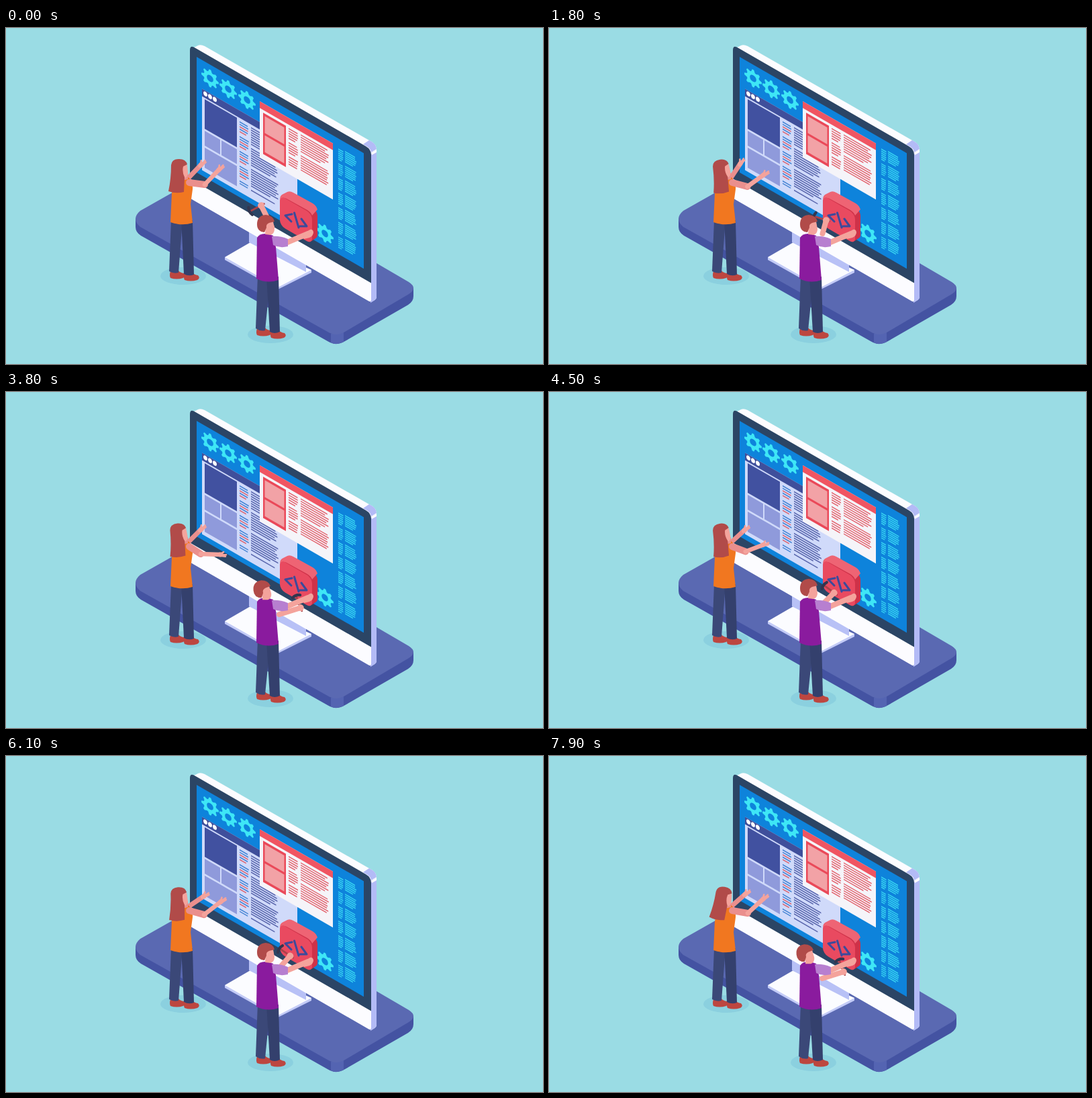
Animation, 800 px wide and 500 px high, one loop 8 s. Source, as an HTML page:

```html
<!DOCTYPE html>
<html lang="en">
<head>
<meta charset="utf-8">
<title>Building a page</title>
<style>
html, body { margin: 0; width: 100%; height: 100%; overflow: hidden; background: #9adce4; }
svg { display: block; width: 800px; height: 500px; }
</style>
</head>
<body>
<svg id="stage" viewBox="0 0 800 500" xmlns="http://www.w3.org/2000/svg"></svg>
<script>
const LOOP = 8000, STEP = 100, SWING = 820, HIT = 3800;
const SKIN = '#f4a39c', SKIN_DARK = '#ea8f8d', HAIR = '#b14b49', DENIM = '#3b4878', SHOE = '#bd4640';
const SLOPE = 0.575;

const path = (d, fill, more = '') => `<path d="${d}" fill="${fill}" ${more}/>`;
const line = (d, color, width) =>
  path(d, 'none', `stroke="${color}" stroke-width="${width}" stroke-linecap="round" stroke-linejoin="round"`);
const rect = (x, y, w, h, fill, r = 0) =>
  `<rect x="${x}" y="${y}" width="${w}" height="${h}" rx="${r}" fill="${fill}"/>`;
const oval = (x, y, rx, ry, fill) => `<ellipse cx="${x}" cy="${y}" rx="${rx}" ry="${ry}" fill="${fill}"/>`;
const wall = (x, y, inner) => `<g transform="matrix(1 ${SLOPE} 0 1 ${x} ${y})">${inner}</g>`;

let seed = 11;
const random = () => (seed = (seed * 16807) % 2147483647) / 2147483647;

// Rows of text as bars; a gap follows each group of rows.
function rows(x, y, width, count, group, pitch, gap, color, accent = color) {
  let out = '';
  for (let i = 0; i < count; i++) {
    const top = y + i * pitch + Math.floor(i / group) * gap;
    const short = i % group === group - 1 ? 0.7 : 0.86 + random() * 0.14;
    out += rect(x, top, width * short, 1.7, i % group === 2 || i % group === 4 ? accent : color);
  }
  return out;
}

function gear(x, y) {
  let d = '';
  for (let i = 0; i < 32; i++) {
    const a = (i - 0.5) / 32 * Math.PI * 2;
    const r = i % 4 < 2 ? 13 : 9.6;
    d += `${i ? 'L' : 'M'}${(x + r * Math.cos(a)).toFixed(1)} ${(y + r * Math.sin(a)).toFixed(1)}`;
  }
  d += `ZM${x - 4.8} ${y}a4.8 4.8 0 1 0 9.6 0a4.8 4.8 0 1 0 -9.6 0Z`;
  return path(d, '#3ee6f6', 'fill-rule="evenodd"');
}

function platform() {
  const top = 'M200 272L246 246Q262 238 278 246L552 350L600 378Q614 387 600 396L505 452Q492 460 479 452L200 296Q186 284 200 272Z';
  return path('M193 283L193 296Q193 304 201 309L479 466Q492 474 505 466L599 412Q607 407 607 399L607 387Z', '#4453a2')
    + path('M484 455L484 468Q492 473 503 467L503 453Z', '#5464b2')
    + path(top, '#5a69b2');
}

function stand() {
  return path('M326 341L326 345L405 389L455 364L455 360Z', '#c3cbf7')
    + path('M326 341L364 319L455 360L405 386Z', '#fbfcff')
    + path('M362 298L447 345L447 363L362 319Z', '#b8c1f6');
}

function monitor() {
  const shell = path('M274 40Q274 33 280 29L286 26Q290 24 296 27L546 170Q552 174 552 182L552 400Q552 403 549 405L544 408L274 253Z', '#fcfcff')
    + path('M544 186L552 181L552 400Q552 403 549 405L543 409Z', '#b3bbf6')
    + path('M532 173L541 167L546 170Q551 173 552 180L544 185Q543 179 537 176Z', '#b3bbf6')
    + path('M544 186L552 181L552 185L545 189Z', '#fcfcff');
  const face = rect(-10, 180, 270, 36, '#fcfcff', 4)
    + path('M-10 -4Q-10 -13 -2 -12L252 -12Q260 -12 260 -4L260 187L-10 187Z', '#2b4565')
    + rect(0, 0, 249, 172, '#0e83db');
  return shell + wall(284, 43, face + contents());
}

function contents() {
  let out = [[20, 20.5], [47, 21], [75, 21], [191, 153]].map(p => gear(...p)).join('');

  // Lavender window
  out += rect(8, 43, 142, 121, '#d0dafa') + rect(8, 43, 142, 11, '#3f4f9b');
  for (const x of [13, 20, 27]) out += oval(x, 47.6, 3, 3.4, '#fff');
  out += rect(12, 56, 48, 44, '#4151a0') + rect(12, 103, 23, 22, '#8f9adb')
    + rect(37, 103, 23, 22, '#8f9adb') + rect(12, 128, 48, 30, '#8f9adb')
    + rows(64, 59, 14, 22, 5, 3.6, 4, '#3f80d2', '#dc6672')
    + rows(81, 58, 41, 25, 8, 3.5, 3, '#5865ac');

  // Red window
  out += rect(94, 12, 109, 83.5, '#f5f4f9') + rect(94, 12, 109, 10, '#f05562')
    + rect(99, 26, 34, 61.5, '#ea4959')
    + rect(101.5, 30, 29, 25, '#f2a2a6') + rect(101.5, 58.5, 29, 25, '#f2a2a6')
    + rows(137, 27, 14, 14, 5, 3.6, 3, '#e3636e')
    + rows(155, 26, 42, 15, 8, 3.5, 3, '#e3636e');

  // Code strip
  out += rows(211, 15, 7.5, 42, 6, 3, 3.8, '#38d4f2') + rows(221, 13, 17, 42, 6, 3, 3.8, '#38d4f2');
  return out;
}

function tag() {
  let out = '';
  for (let i = 8; i >= 1; i--) {
    out += wall(408 + i, 249 - i * 0.68, rect(0, 0, 48, 45, '#cf3249', 8));
  }
  return out
    + path('M408 255Q408 249 413 247L419 244Q423 242 428 245L457 261Q462 264 464 270L456 279Q454 274 449 271L418 254Q412 251 408 255Z', '#ee6474')
    + wall(408, 249, rect(0, 0, 48, 45, '#e94a60', 8))
    + line('M426 277L416 279L425 288M429.5 275L436 297M440 284L448 295L438 295', '#3c4a9b', 3);
}

const shoe = (x, y) => path(`M${x} ${y - 6}L${x + 12} ${y - 7}Q${x + 14} ${y - 4} ${x + 20} ${y - 3}Q${x + 24} ${y + 1} ${x + 19} ${y + 4}Q${x + 9} ${y + 7} ${x} ${y + 4}Q${x - 2} ${y} ${x} ${y - 6}Z`, SHOE);

function woman() {
  return oval(264, 369, 34, 13, '#8bd0df')
    + shoe(245, 368) + shoe(266, 371)
    + path('M246 286L263 286L257 364Q250 366 243 362Z', DENIM)
    + path('M261 286L278 286L280 367Q272 370 265 366Z', '#34406d')
    + '<g id="farArm"></g>'
    + path('M252 222L270 221Q279 227 278 240L275 262L278 290Q262 295 245 289L247 246Z', '#f17720')
    + path('M262 214L271 216L271 225L262 227Z', SKIN_DARK)
    + '<g id="nearArm"></g>'
    + '<g id="girlHead">'
    + path('M262 202L270 204L271 215Q271 222 266 223L259 222Z', SKIN)
    + path('M246 204Q247 195 258 195Q268 195 270 203L264 206Q262 214 266 222L265 244Q253 247 242 243Q246 224 246 204Z', HAIR)
    + '</g>';
}

function man() {
  return oval(394, 456, 34, 13, '#8bd0df')
    + shoe(374, 453) + shoe(395, 457)
    + path('M375 368L394 370L386 450Q379 452 372 447Z', DENIM)
    + path('M388 370L406 370L408 452Q400 456 393 452Z', '#34406d')
    + path('M374 312Q378 305 389 306L398 309L402 326L406 375Q389 381 373 373Z', '#8a1b9e')
    + line('M419 319L450 306', SKIN, 8)
    + path('M443 306L453 300Q457 299 458 304Q458 309 452 312L444 314Z', SKIN)
    + path('M396 310Q408 309 420 314L420 325Q408 328 398 323Z', '#b77fd0')
    + '<g id="manHead">'
    + path('M387 290L398 288L400 299Q400 306 394 308L386 307Z', SKIN)
    + path('M374 292Q374 279 387 278Q398 279 400 288L392 290Q387 292 388 297L385 304Q374 303 374 292Z', HAIR)
    + '</g>';
}

stage.innerHTML = platform() + stand() + monitor() + tag() + woman() + '<g id="hammer"></g>' + man();
const part = id => document.getElementById(id);
const parts = Object.fromEntries(['farArm', 'nearArm', 'girlHead', 'hammer', 'manHead'].map(id => [id, part(id)]));

// time, head tilt, far hand, near elbow, near hand
const TYPING = [
  [0, 0, 291, 203, 296, 233, 318, 210],
  [1100, -9, 287, 202, 295, 237, 321, 222],
  [2500, -6, 284, 200, 296, 235, 320, 214],
  [3800, -6, 291, 204, 290, 241, 320, 242],
  [5300, -9, 293, 206, 296, 233, 319, 209],
  [7000, 5, 298, 211, 294, 240, 323, 225],
  [7900, 9, 293, 205, 296, 234, 320, 212]
];
// phase, elbow, hand, hammer angle, head dip
const STRIKE = [
  [0, 407, 331, 439, 321, 249, 1],
  [120, 411, 314, 425, 297, 214, 0],
  [300, 396, 296, 380, 264, 152, 0],
  [340, 403, 298, 399, 271, 177, 0],
  [580, 412, 314, 427, 301, 219, 0],
  [680, 410, 312, 423, 297, 214, 0],
  [740, 412, 316, 430, 304, 223, 0],
  [SWING, 407, 331, 439, 321, 249, 1]
];

function pose(table, t) {
  let i = 1;
  while (i < table.length - 1 && table[i][0] < t) i++;
  const a = table[i - 1], b = table[i];
  const k = (t - a[0]) / (b[0] - a[0]);
  const e = (1 - Math.cos(Math.PI * k)) / 2;
  return a.slice(1).map((v, n) => v + (b[n + 1] - v) * e);
}

function hand(x, y, ex, ey) {
  const turn = Math.atan2(y - ey, x - ex) * 180 / Math.PI;
  return `<g transform="translate(${x} ${y}) rotate(${turn})">${oval(-1, 0, 5, 3.5, SKIN)}${line('M1 -2L4 -4M1 0L8 0M1 2L7 2.5', SKIN, 2.6)}</g>`;
}

function draw(t) {
  const [tilt, fx, fy, ex, ey, nx, ny] = pose(TYPING, t);
  parts.girlHead.setAttribute('transform', `rotate(${tilt} 262 220)`);
  parts.farArm.innerHTML = line(`M269 226L${fx} ${fy}`, SKIN_DARK, 7) + hand(fx, fy, 269, 226);
  parts.nearArm.innerHTML = line(`M273 230L${ex} ${ey}`, SKIN_DARK, 10)
    + line(`M${ex} ${ey}L${nx} ${ny}`, SKIN, 6.5) + hand(nx, ny, ex, ey);

  const phase = ((t - HIT) % SWING + SWING) % SWING;
  const [bx, by, hx, hy, angle, dip] = pose(STRIKE, phase);
  parts.manHead.setAttribute('transform', `translate(${-4 * dip} ${2 * dip}) rotate(${-6 * dip} 388 306)`);
  parts.hammer.innerHTML = line(`M${bx} ${by}L${hx} ${hy}`, SKIN, 8)
    + `<g transform="translate(${hx} ${hy}) rotate(${angle})">`
    + line('M-5 0L18 0', '#a8434a', 2.8) + line('M18 -6Q21 0 18 6', '#33364f', 4.2)
    + oval(0, 0, 5, 4.8, SKIN) + '</g>';
}

const start = performance.now();
function tick() {
  const t = (performance.now() - start) % LOOP;
  draw(Math.floor(t / STEP) * STEP);
  requestAnimationFrame(tick);
}
tick();
</script>
</body>
</html>
```
